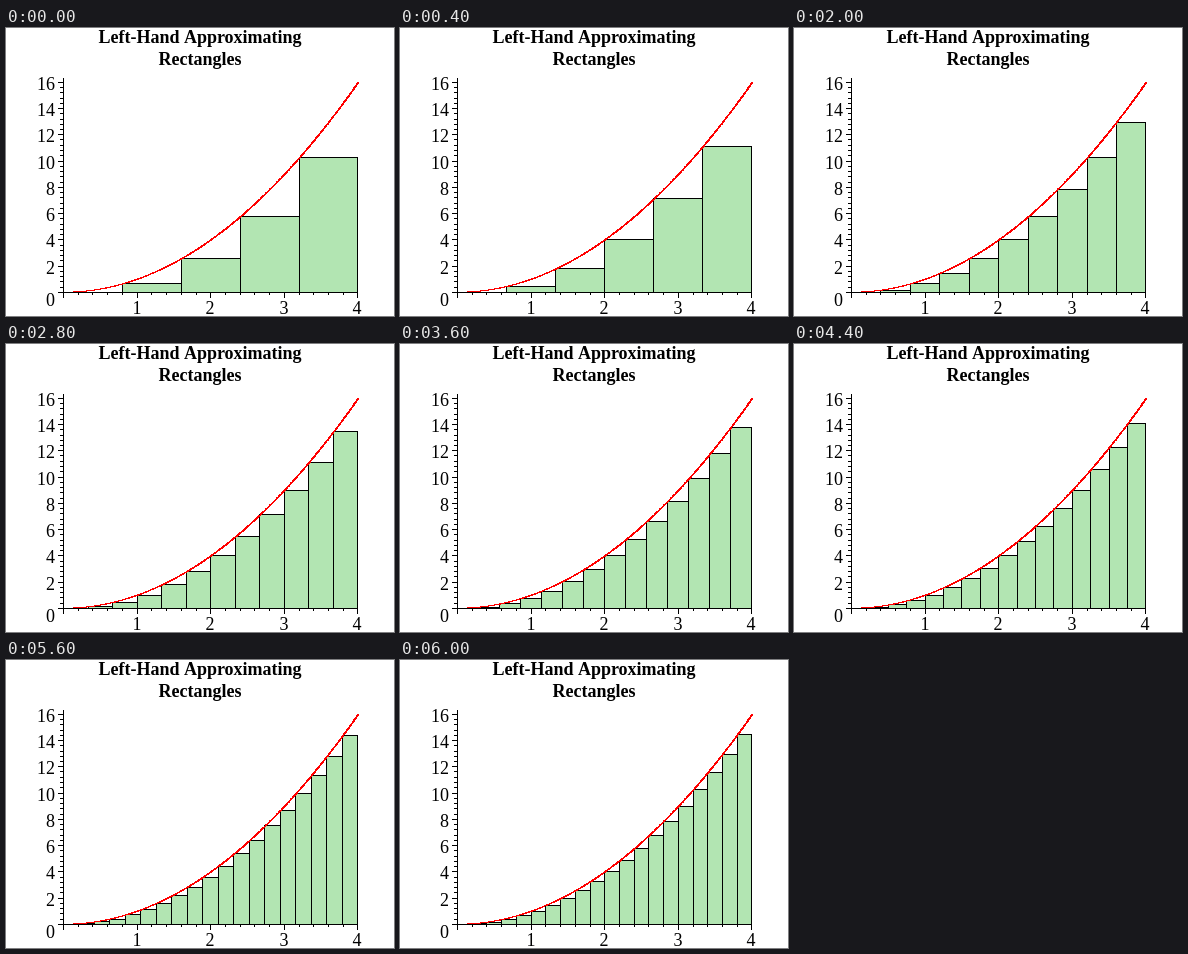
An HTML page with a canvas for the animation above (6400 ms loop, 388x288 px).

```html
<!DOCTYPE html>
<html lang="en">
<head>
<meta charset="utf-8">
<title>Left-Hand Approximating Rectangles</title>
<style>
  html, body { margin: 0; width: 100%; height: 100%; overflow: hidden; background: #fff; }
  canvas { display: block; }
</style>
</head>
<body>
<canvas id="plot" width="388" height="288"></canvas>
<script>
const ctx = document.getElementById('plot').getContext('2d');
const STEP = 400, FIRST = 5, LAST = 20, X_MAX = 4;
const LEFT = 57, BASE = 264, TOP = 50;

const f = x => x * x;
const px = x => Math.round(LEFT + 73.615 * x);
const py = y => Math.floor(BASE + 0.25 - 13.125 * y);

function box(x, y, w, h, color) {
  ctx.fillStyle = color;
  ctx.fillRect(x, y, w, h);
}

function text(str, x, y, align, weight = '') {
  ctx.font = `${weight} 18px "Liberation Serif", Times, serif`;
  ctx.textAlign = align;
  ctx.fillStyle = '#000';
  ctx.fillText(str, x, y);
}

function drawRectangles(n) {
  const dx = X_MAX / n;
  for (let i = 0; i < n; i++) {
    const x0 = px(i * dx), x1 = px((i + 1) * dx), y = py(f(i * dx));
    box(x0, y, x1 - x0 + 1, BASE - y + 1, '#000');
    box(x0 + 1, y + 1, x1 - x0 - 1, BASE - y - 1, '#b2e5b2');
  }
}

// A flat two-pixel pen keeps the curve crisp, without antialiasing.
function drawCurve() {
  for (let x = 0; x <= X_MAX; x += 0.005) {
    box(px(x), py(f(x)), 2, 1, '#f00');
  }
}

function drawAxes() {
  box(LEFT, TOP, 1, BASE - TOP + 1, '#000');
  box(LEFT, BASE, px(X_MAX) - LEFT + 1, 1, '#000');
  for (let i = 0; i <= 20; i++) {
    box(px(i / 5), BASE, 1, i % 5 ? 3 : 6, '#000');
    if (i && i % 5 === 0) text(i / 5, px(i / 5), 286, 'center');
  }
  for (let i = 0; i <= 40; i++) {
    const y = py(i * 0.4), len = i % 5 ? 3 : 5;
    box(LEFT - len, y, len, 1, '#000');
    if (i % 5 === 0) text(i * 0.4, 49, i ? y + 8 : 278, 'right');
  }
}

function draw(now) {
  const n = FIRST + Math.floor(now / STEP) % (LAST - FIRST + 1);
  box(0, 0, 388, 288, '#fff');
  text('Left-Hand Approximating', 194, 15, 'center', 'bold');
  text('Rectangles', 194, 37, 'center', 'bold');
  drawRectangles(n);
  drawCurve();
  drawAxes();
  requestAnimationFrame(() => draw(performance.now()));
}

draw(performance.now());
</script>
</body>
</html>
```
